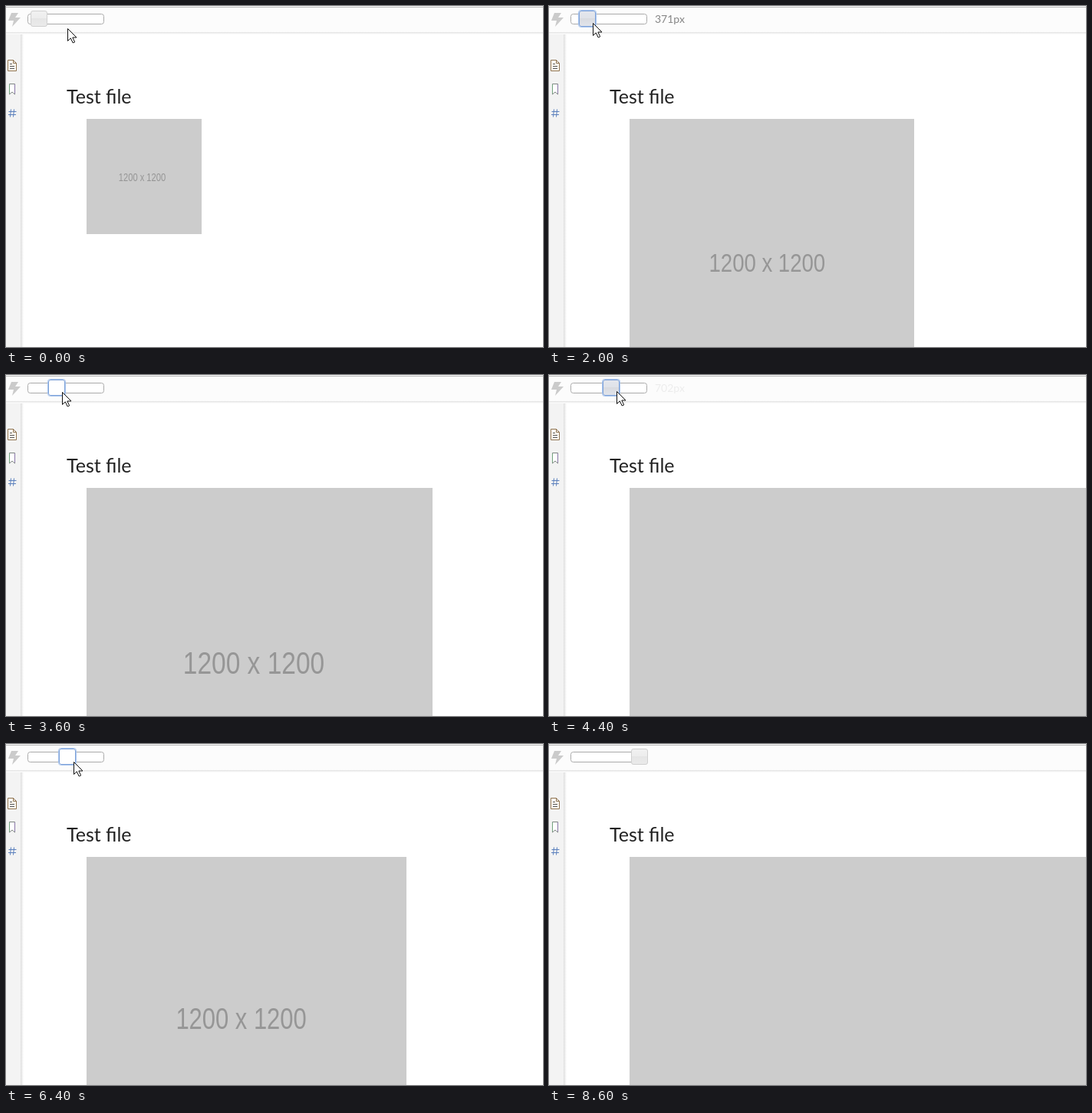
Animation of 700x444 px, one loop 8.8 s. Source, as an HTML page:

```html
<!DOCTYPE html>
<html lang="en">
<head>
<meta charset="utf-8">
<title>Image size slider</title>
<style>
html, body { margin: 0; width: 100%; height: 100%; overflow: hidden; background: #fff; }
svg { display: block; }
text { font-family: Lato, sans-serif; }
.placeholder text { font-family: "Liberation Sans", Arial, sans-serif; }
</style>
</head>
<body>
<svg width="700" height="444" viewBox="0 0 700 444">
  <defs>
    <linearGradient id="edge"><stop stop-color="#dedede"/><stop offset="1" stop-color="#fff"/></linearGradient>
    <linearGradient id="below" x2="0" y2="1"><stop stop-color="#e2e2e2"/><stop offset="1" stop-color="#fff"/></linearGradient>
    <linearGradient id="idle" x2="0" y2="1">
      <stop stop-color="#f1f1f1"/><stop offset=".5" stop-color="#ededed"/>
      <stop offset=".5" stop-color="#e5e5e5"/><stop offset="1" stop-color="#ebebeb"/>
    </linearGradient>
    <linearGradient id="focus" x2="0" y2="1">
      <stop stop-color="#e4e7ee"/><stop offset=".5" stop-color="#e0e2e8"/>
      <stop offset=".5" stop-color="#d9dbe0"/><stop offset="1" stop-color="#e1e4eb"/>
    </linearGradient>
  </defs>

  <!-- page -->
  <rect width="700" height="444" fill="#fff"/>
  <text x="79" y="127" font-size="25" fill="#222">Test file</text>
  <svg class="placeholder" id="image" x="105" y="147" viewBox="0 0 1200 1200">
    <rect width="1200" height="1200" fill="#ccc"/>
    <text transform="translate(580 644) scale(.81 1)" font-size="110" text-anchor="middle" fill="#969696">1200 x 1200</text>
  </svg>

  <!-- sidebar -->
  <rect y="35" width="19" height="409" fill="#f3f3f3"/>
  <rect x="19" y="35" width="4" height="409" fill="url(#edge)"/>
  <g fill="none">
    <path d="M2.5 70.5h7l4 4v10h-11zM9.5 70.5v4h4" fill="#fffaf2" stroke="#8f7350"/>
    <path d="M5 75.5h3M5 78.5h6M5 81.5h6" stroke="#555"/>
    <path d="M4.5 115V101.5h7V115l-3.500-3z" fill="#fff" stroke="#7d8581"/>
    <path d="M4.500 102v12" stroke="#72a37d"/>
    <path d="M11.500 102v12" stroke="#8a78a8"/>
    <path d="M6.500 134.500l-1 10M10.500 134.500l-1 10M3.500 137.500h10M3 141.500h10" stroke="#5b80bd"/>
  </g>

  <!-- toolbar -->
  <rect width="700" height="34" fill="#fcfcfc"/>
  <path d="M0 1.500H700" stroke="#b8b8b8"/>
  <rect y="34" width="700" height="3" fill="url(#below)"/>
  <path d="M7 9h9l-4 6h7L8 27l2-8H3z" fill="#cbcbcb"/>
  <rect x="28.500" y="10.500" width="99" height="13" rx="3" fill="#fff" stroke="#aaa"/>
  <text id="label" x="138" y="22" font-size="14" fill="#868686"></text>
  <g id="thumb">
    <rect id="glow" x="-.5" y="5.500" width="23" height="22" rx="3" fill="none" stroke="#a9c5ee"/>
    <rect id="face" x=".5" y="6.500" width="21" height="20" rx="2.500"/>
  </g>
  <path id="cursor" d="M.5.500V16.500l3.800-3.600 2.900 6.100 2.500-1.100-2.900-5.900h5.200z" fill="#fff" stroke="#111"/>
</svg>
<script>
const LOOP = 8800, STEP = 200;

// time, cursor x, cursor y, thumb left
const path = [
  [0, 80, 29, 32], [800, 50, 22, 32], [1400, 50, 22, 32], [1800, 57, 22, 39],
  [2400, 57, 22, 39], [2800, 64, 22, 46], [3200, 64, 22, 46], [3600, 73, 22, 55],
  [3800, 88, 21, 70], [4800, 88, 21, 70], [5200, 64, 17, 48], [5400, 59, 17, 43],
  [6000, 60, 20, 43], [6200, 68, 22, 50], [6400, 88, 23, 69], [6800, 129, 21, 107],
  [7400, 129, 21, 107], [8400, 34, 450, 107], [LOOP, 34, 450, 107]
];

// press time, release time, image width set on release
const drags = [
  [1400, 1800, 371], [2600, 2800, 451], [3400, 3800, 702],
  [5000, 5600, 417], [6200, 6800, 1103]
];

const [image, label, thumb, glow, face, cursor] =
  ["image", "label", "thumb", "glow", "face", "cursor"].map(id => document.getElementById(id));

const setAll = (node, attrs) => {
  for (const name in attrs) node.setAttribute(name, attrs[name]);
};

function poseAt(t) {
  const i = path.findIndex(key => key[0] > t);
  const a = path[i - 1], b = path[i];
  const k = (t - a[0]) / (b[0] - a[0]);
  return a.map((v, n) => Math.round(v + (b[n] - v) * k)).slice(1);
}

function labelOpacity(age) {
  return Math.max(0, Math.min(1, 0.4 + age / 300, (650 - age) / 400));
}

function draw(t) {
  const [x, y, left] = poseAt(t);
  const pressed = drags.some(([down, up]) => t >= down && t < up);
  const done = drags.filter(drag => t >= drag[1]).pop();
  const focused = t >= 1400 && t < 8600;
  const size = done ? done[2] : 150;

  setAll(image, { width: size, height: size });
  label.textContent = done ? size + "px" : "";
  setAll(label, { opacity: done && !pressed ? labelOpacity(t - done[1]) : 0 });
  setAll(thumb, { transform: `translate(${left} 0)` });
  setAll(glow, { opacity: focused ? 1 : 0 });
  setAll(face, {
    fill: pressed ? "#fff" : focused ? "url(#focus)" : "url(#idle)",
    stroke: focused ? "#7ea2d8" : t >= 600 && t < 1400 ? "#aaa" : "#d0d0d0"
  });
  setAll(cursor, { transform: `translate(${x} ${y})`, opacity: t < 8400 ? 1 : 0 });
}

const start = performance.now();
function tick() {
  const t = (performance.now() - start) % LOOP;
  draw(Math.floor(t / STEP) * STEP);
  requestAnimationFrame(tick);
}
tick();
</script>
</body>
</html>
```
